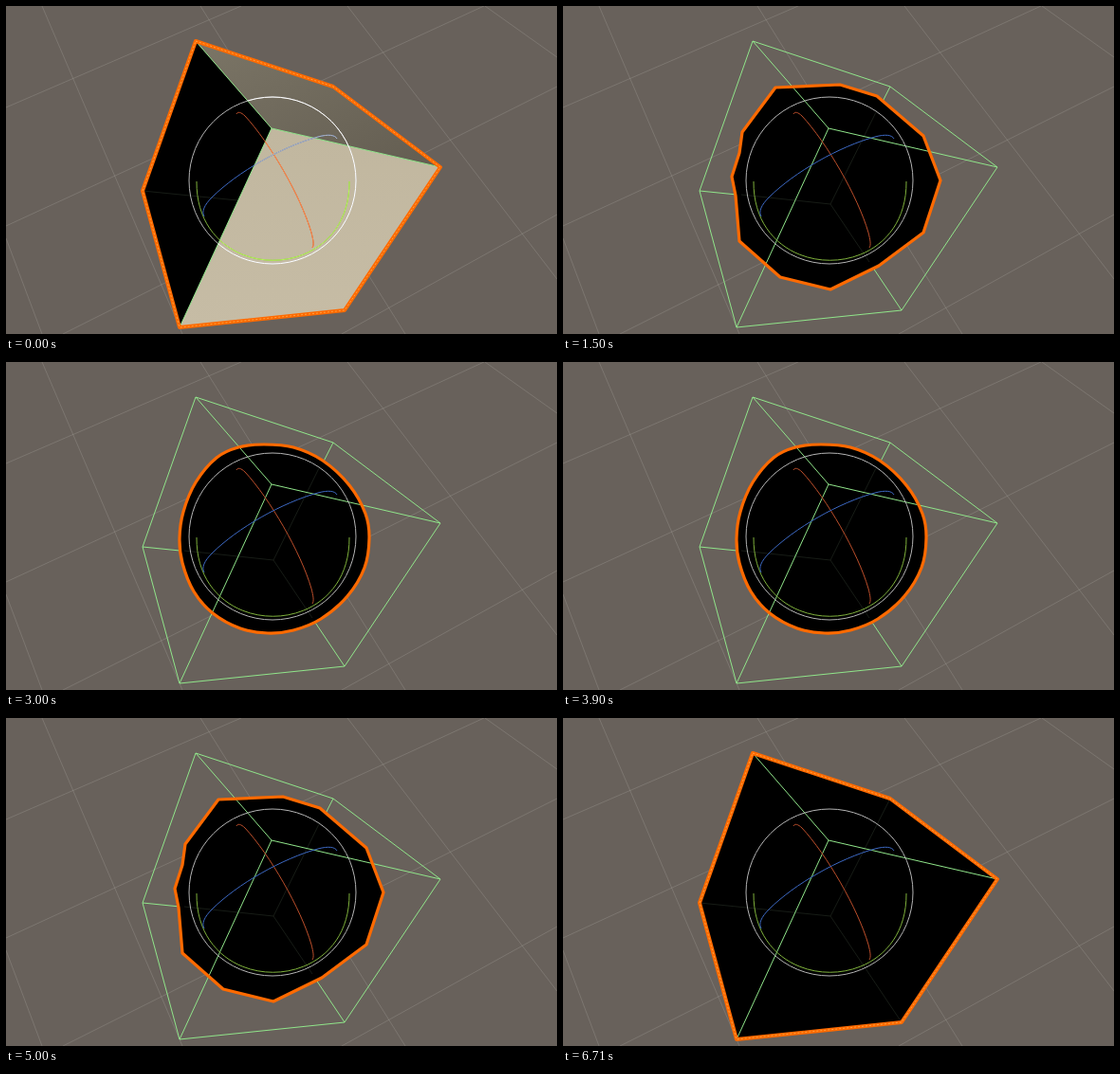
These frames come from a looping animation (581x346 px, 7.52 s). An HTML page:

```html
<!DOCTYPE html>
<html lang="en">
<head>
<meta charset="utf-8">
<title>Cube and sphere subdivision</title>
<style>
  html, body { margin: 0; width: 100%; height: 100%; overflow: hidden; background: #68615b; }
  svg { display: block; width: 100%; height: 100%; }
  path, circle, ellipse { fill: none; }
  .grid { stroke: #aaa7a0; stroke-opacity: .3; }
  .wire { stroke: #90e58a; stroke-width: 1; }
  .faint { stroke: #171c16; stroke-width: 1; }
  .edge { stroke: #ff6a00; stroke-width: 3.2; stroke-linejoin: round; }
  .dots { stroke: #ffae4e; stroke-width: .8; stroke-dasharray: 2 2; }
</style>
</head>
<body>
<svg viewBox="0 0 581 346" preserveAspectRatio="none">
  <defs>
    <linearGradient id="shade" x1="0" y1="0" x2="1" y2="1">
      <stop offset="0" stop-color="#7b7566"/>
      <stop offset="1" stop-color="#635d51"/>
    </linearGradient>
    <linearGradient id="light" x1="0" y1="0" x2="0" y2="1">
      <stop offset="0" stop-color="#c1b79f"/>
      <stop offset="1" stop-color="#c6bca5"/>
    </linearGradient>
    <clipPath id="litArea"><path d="M200 37L345 85L458 170L357 321L183 339L280 129Z"/></clipPath>
    <g id="rings">
      <circle cx="281" cy="184" r="88"/>
      <path d="M201 185C200 296 363 296 362 185"/>
      <path d="M243 114C244 111 248 112 252 116C278 144 311 201 322 239C324 247 325 252 323 255"/>
      <path d="M209 222C206 217 209 210 217 202C244 175 292 148 329 138C340 135 347 136 349 140"/>
    </g>
  </defs>
  <rect width="581" height="346" fill="#68615b"/>
  <path class="grid" d="M0 107L248 0M0 232L504 0M60 346L581 85M354 346L581 220M0 245L38 346M38 0L186 346M205 0L421 346M360 0L581 288M505 0L581 54"/>
  <path id="back" class="wire"/>
  <path id="body" style="fill:#000"/>
  <g id="lit">
    <path d="M200 37L345 85L458 170L280 129Z" style="fill:url(#shade)"/>
    <path d="M280 129L458 170L357 321L183 339Z" style="fill:url(#light)"/>
  </g>
  <path id="hidden" class="faint"/>
  <path id="front" class="wire"/>
  <path id="edge" class="edge"/>
  <path id="dots" class="dots"/>
  <g id="gizmo"></g>
  <g id="brightGizmo" clip-path="url(#litArea)"></g>
</svg>
<script>
const $ = id => document.getElementById(id);
const LOOP = 7520;

const line = pts => 'M' + pts.map(p => p.join(' ')).join('L');
const closed = pts => line(pts) + 'Z';

// Closed Catmull-Rom curve through the points
function smooth(pts) {
  const n = pts.length, at = i => pts[(i + n) % n];
  return 'M' + pts[0].join(' ') + pts.map((p, i) => {
    const a = at(i - 1), c = at(i + 1), d = at(i + 2);
    const c1 = p.map((v, k) => v + (c[k] - a[k]) / 6);
    const c2 = c.map((v, k) => v - (d[k] - p[k]) / 6);
    return 'C' + [...c1, ...c2, ...c].join(' ');
  }).join('') + 'Z';
}

const cube = [[200, 37], [345, 85], [458, 170], [357, 321], [183, 339], [144, 195]];
const near = [280, 129], far = [282, 209];
const spokes = (hub, ids) => ids.map(i => line([hub, cube[i]])).join('');

const coarse = [[224, 86], [292, 83], [331, 95], [380, 137], [398, 184], [380, 239], [333, 274],
  [282, 299], [229, 286], [186, 248], [182, 200], [178, 180], [186, 155], [189, 133]];
const medium = [[257, 86], [284, 86], [308, 90], [334, 102], [350, 115], [364, 130], [374, 151],
  [383, 162], [384, 185], [383, 208], [371, 232], [355, 252], [331, 271], [306, 283], [280, 288],
  [257, 286], [234, 278], [214, 265], [196, 245], [190, 225], [182, 205], [182, 185], [185, 160],
  [194, 135], [209, 112], [233, 93]];
const round = [[272, 87], [303, 90], [334, 104], [362, 130], [379, 160], [383, 186], [378, 217],
  [360, 247], [332, 271], [303, 283], [276, 286], [247, 281], [218, 265], [198, 242], [186, 212],
  [183, 186], [187, 158], [200, 127], [222, 101], [245, 90]];

const shapes = { cube: closed(cube), coarse: closed(coarse), medium: closed(medium), round: smooth(round) };
const steps = [[0, 'cube', true], [1500, 'coarse'], [2000, 'medium'], [3000, 'round'],
  [4500, 'medium'], [5000, 'coarse'], [5500, 'cube']];

function paintRings(id, colors) {
  [...$('rings').children].forEach((ring, i) => {
    const copy = ring.cloneNode();
    copy.setAttribute('stroke', colors[i]);
    $(id).append(copy);
  });
}
paintRings('gizmo', ['#b4b4b4', '#7fb13c', '#bd4f2b', '#3c68c2']);
paintRings('brightGizmo', ['#ffffff', '#b9f55c', '#ff8c4b', '#b5b7bd']);

$('back').setAttribute('d', closed(cube) + spokes(far, [1, 3, 5]));
$('front').setAttribute('d', spokes(near, [0, 2, 4]));
$('dots').setAttribute('d', shapes.cube);

let shown;
function draw(t) {
  const step = steps.filter(s => s[0] <= t).pop();
  if (step === shown) return;
  shown = step;
  const [, name, lit] = step, isCube = name === 'cube';
  const show = (id, on) => $(id).style.display = on ? '' : 'none';
  $('body').setAttribute('d', shapes[name]);
  $('edge').setAttribute('d', shapes[name]);
  $('edge').style.strokeWidth = isCube ? 4 : 3.2;
  // Hidden edges fade out inside the black silhouette
  $('hidden').setAttribute('d', lit ? line([cube[5], [244, 205]])
    : isCube ? spokes(far, [1, 3, 5])
    : line([far, [331, 110]]) + line([far, [323, 270]]) + line([far, [188, 199]]));
  show('lit', lit);
  show('brightGizmo', lit);
  show('dots', isCube);
}

const start = performance.now();
function tick() {
  draw((performance.now() - start) % LOOP);
  requestAnimationFrame(tick);
}
tick();
</script>
</body>
</html>
```
